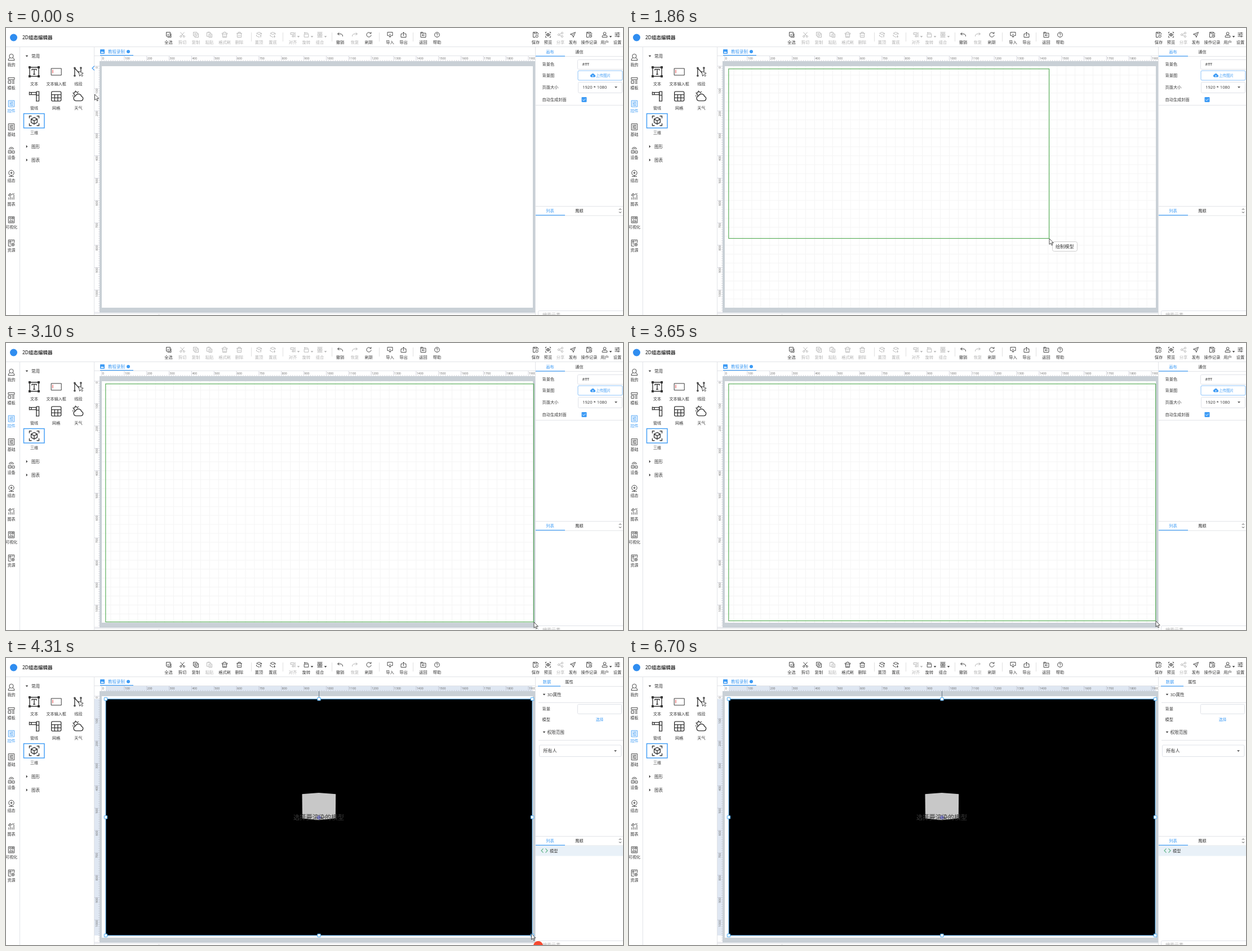
An HTML page that plays this animation: 1095 px wide and 511 px high, repeating every 6800 ms.

```html
<!DOCTYPE html>
<html>
<head>
<meta charset="utf-8">
<title>Editor</title>
<style>
html, body { margin: 0; width: 100%; height: 100%; overflow: hidden; background: #fff; }
svg { display: block; color: #383838; font-family: "Open Sans", "Noto Sans CJK SC", "Noto Sans CJK", sans-serif; }
text { fill: currentColor; white-space: pre; }
.ico { fill: none; stroke: currentColor; stroke-width: .9; }
.dim { color: #b3b3b3; }
.on .wake { color: #383838; }
.blue { color: #3d9bf5; }
</style>
</head>
<body>
<svg id="stage" width="1095" height="511" viewBox="0 0 1095 511"></svg>
<script>
const LOOP = 6800, UNIT = 765 / 1920, X0 = 170, Y0 = 68;
const BLUE = '#3d9bf5', LINE = '#e2e4e8';

// markup helpers
const text = (x, y, s, size = 7.2, anchor = 'middle', extra = '') =>
  `<text x="${x}" y="${y + size * .37}" font-size="${size}" text-anchor="${anchor}" ${extra}>${s}</text>`;
const left = (x, y, s, size, extra) => text(x, y, s, size, 'start', extra);
const rect = (x, y, w, h, fill = 'none', stroke = 'none', extra = '') =>
  `<rect x="${x}" y="${y}" width="${w}" height="${h}" fill="${fill}" stroke="${stroke}" ${extra}/>`;
const hline = (x, y, w, color = LINE, h = 1) => rect(x, y, w, h, color);
const vline = (x, y, h, color = LINE) => rect(x, y, 1, h, color);
const ring = (x, y, r) => `M${x - r} ${y}a${r} ${r} 0 1 0 ${2 * r} 0a${r} ${r} 0 1 0 ${-2 * r} 0`;
const icon = (x, y, d, extra = '') =>
  `<path class="ico" transform="translate(${x} ${y})" d="${d}" ${extra}/>`;
const solid = (x, y, d, fill = 'currentColor') =>
  `<path transform="translate(${x} ${y})" d="${d}" fill="${fill}"/>`;
const caret = (x, y, s = 2.3, fill) => solid(x, y, `M${-s} ${-s / 2}h${2 * s}l${-s} ${s * 1.1}z`, fill);
const group = (cls, body) => `<g class="${cls}">${body}</g>`;
const layer = (id, body) => `<g id="${id}">${body}</g>`;
const field = (x, y, w, h, stroke = '#dfe2e8', fill = '#fff') => rect(x, y, w, h, fill, stroke, 'rx="2"');

// toolbar
const pageBase = 'M4.5-.5v-2l-2-2h-7v9h4M-2.5-4.5v2.5h4.5v-2.5';
const stack = 'M0-4.5l4.5 2-4.5 2.2-4.5-2.2zM-4.5 0v2l4.5 2.4 1-.5M4.5-2.5v2';
const undo = 'M-1.5-4l-3 2.5 3 2.5M-4.5-1.5h4.5q4.5 0 4.5 4.5';
// [x, label, path, state, caret x]; state 0 normal, 1 dim until something is selected, 2 always dim
const tools = [
  [288.5, '全选', 'M-4-4.5h7v7h-7zM-2 4.5h6.5v-6.5M-2.3-1l1.5 1.5 2.6-2.6', 0],
  [313, '剪切', 'M-3.5-4.5l5.5 6.5M3.5-4.5l-5.5 6.5' + ring(-2.8, 3, 1.5) + ring(2.8, 3, 1.5), 1],
  [337, '复制', 'M-4.5-4.5h6.5v6.5h-6.5zM-2 2v2.5h6.5v-6.5h-2.5M-1.2-3v3.5M-3-1.2h3.5', 1],
  [361, '粘贴', 'M-1.5 3h-3v-7h6.5v2.5M-3-4.7h3.5M-1-1.2h5.5v5.7h-5.5zM.5 1h2.5M.5 2.8h2.5', 2],
  [388, '格式刷', 'M-4.5-1v-2h3v-1.7h3v1.7h3v2zM-3.5-1v5.5h7v-5.5M-1.2 1.5v3M1.2 1.5v3', 1],
  [414, '删除', 'M-4.7-2.5h9.4M-2-2.5v-2h4v2M-3.6-2.5v7h7.2v-7M-1.2 0v2.4M1.2 0v2.4', 1],
  [449, '置顶', stack + 'M3 4.8v-4M1.4 2.2l1.6-1.6 1.6 1.6', 1],
  [473.5, '置底', stack + 'M3 .6v4M1.4 3l1.6 1.6 1.6-1.6', 1],
  [509, '对齐', 'M4-4.5v9M-4-3.5h6v3h-6zM-1 1.5h3v2.3h-3z', 2, 519],
  [533, '旋转', 'M-3.8-1h7.6v5.2h-7.6zM-3.8-3.3h5q2 0 2.4 1.4M-2.3-4.8l-1.6 1.5 1.6 1.5', 1, 543],
  [557, '组合', 'M-4.5-4.3h9M-4.5 4.3h9M-3.6-2.3h7.2v4.6h-7.2zM-1.5-.8h3v1.6h-3z', 1, 567],
  [593, '撤销', undo, 0],
  [619, '恢复', undo, 2],
  [644, '刷新', 'M3.3-2.5a4.1 4.1 0 1 0 .8 3M4-4.8v2.6h-2.6', 0],
  [681.5, '导入', 'M-2 1.5h-2.5v-6h9v6h-2.5M0-2v6.3M-2 2.4l2 2 2-2', 0],
  [705.5, '导出', 'M-2-1.5h-2.5v6h9v-6h-2.5M0 2v-6.3M-2-2.4l2-2 2 2', 0],
  [740.5, '返回', 'M-4.5-2.8h9v7.3h-9zM-4.5-2.8v-1.7h3.5l1 1.7M0-1l-2 1.7 2 1.7M-2 .7h4.5', 0],
  [765, '帮助', ring(0, 0, 4.4) + 'M-1.4-1a1.4 1.4 0 1 1 2 1.2q-.6.3-.6 1M0 2v1', 0],
  [940, '保存', pageBase + ring(2.2, 2.5, 2.1), 0],
  [962, '预览', 'M-4 0q4-4.6 8 0q-4 4.6-8 0z' + ring(0, 0, 1.3) + 'M-4.5-2.5v-2h2M2.5-4.5h2v2M4.5 2.5v2h-2M-2.5 4.5h-2v-2', 0],
  [984, '分享', ring(-3, 0, 1.6) + ring(3, -3, 1.6) + ring(3, 3, 1.6) + 'M-1.6-.7l3.2-1.6M-1.6.7l3.2 1.6', 2],
  [1006, '发布', 'M4.5-4.5l-9 3.7 3.8 1.4 1.5 4zM-.7.6l2.4-2.4', 0],
  [1035, '操作记录', pageBase + ring(2.2, 2.2, 2.4) + 'M2.2 1v1.4h1.2', 0],
  [1062.5, '用户', ring(0, -2.2, 2.3) + 'M-4.4 4.4v-1.4q0-2 2.4-2h4q2.4 0 2.4 2v1.4z', 0, 1073],
  [1085, '设置', 'M-4.6-3h9.2M-4.6 0h9.2M-4.6 3h9.2M1.6-4.5v3M-1.6-1.5v3M1.6 1.5v3', 0]
];
const toolbar = () => {
  let s = rect(0, 0, 1095, 33, '#fff') + hline(0, 33, 1095) +
    `<circle cx="13.5" cy="17" r="6.5" fill="#2f8df0"/>` +
    left(29, 17, '2D组态编辑器', 8.5, 'font-weight="600"');
  for (const x of [435, 491, 578, 662, 722]) s += vline(x, 8, 16, '#e0e0e0');
  for (const [x, label, d, state, cx] of tools) {
    const flip = label === '恢复' ? '<g transform="matrix(-1 0 0 1 1238 0)">' : '<g>';
    s += group(['', 'dim wake', 'dim'][state],
      flip + icon(x, 12, d) + '</g>' + text(x, 25, label) + (cx ? caret(cx, 15.5) : ''));
  }
  return s;
};

// left navigation
const sliders = 'M-5.2-5.5h10.4v11h-10.4zM-3.5-2.7h7M-3.5 0h7M-3.5 2.7h7M1.2-3.7v2M-1.2-1v2M1.2 1.7v2';
const sheet = 'M5.2-.5v-5h-10.4v11h5';
const nav = [
  ['我的', ring(0, -2, 3.6) + 'M-2.3 1q-3.2 1-3.2 4.5h11q0-3.5-3.2-4.5'],
  ['模板', 'M-5.5-5h11v3.4h-11zM-5.5.5h4.6v4.7h-4.6zM1.2.5h4.3M1.2 2.8h4.3M1.2 5.1h4.3'],
  ['控件', sliders],
  ['基础', sliders],
  ['设备', 'M-5.3.8h5v4.6h-5zM1.5 1.5h4v3.9h-4zM-3.5 3h1.5M-4-1.3q0-3.8 4-3.8t4 3.8M-1.8-1.2q0-1.8 1.8-1.8t1.8 1.8'],
  ['组态', ring(0, -.8, 4.7) + 'M0-3v4.4M-2.2-.8h4.4M-4.5 5.6h9M0 3.8v1.8'],
  ['图表', 'M-4.5 5.5v-4M-1.5 5.5v-5.5M1.5 5.5v-4M4.5 5.5v-9M-5-3.2a2.2 2.2 0 1 0 2.2-2.2v2.2zM.5-3l1.5-2 1.5 1 1.8-1.8'],
  ['可视化', sheet + 'h5.4v-6M-3.5 3.5l2.5-3.5 2 2 1-1 1.5 2.5z' + ring(-2, -2.8, 1.3) + 'M1-4h2.5v2.5h-2.5z'],
  ['资源', sheet + 'M-3.3-3.5h2.6v2.4h-2.6zM1-3.5h2.3M-3.3 1.5h3' + ring(2.8, 2.8, 2.5) + 'M2.8 1.6v2.4M1.6 2.8h2.4']
];
const navbar = () => nav.map(([label, d], i) => {
  const y = 52 + 41.35 * i;
  return group(i === 2 ? 'blue' : '', icon(9.5, y, d) + text(9.5, y + 13, label, 7.1));
}).join('') + vline(24, 34, 477);

// widget palette
const corners = (a, b) => [[-a, -a], [a, -a], [a, a], [-a, a]]
  .map(([x, y]) => `M${x - b} ${y - b}h${2 * b}v${2 * b}h${-2 * b}z`).join('');
const widgets = [
  ['文本', 'M-8-8h16v16h-16z' + corners(8, 1.3) + 'M-4-2.5v-2h8v2M0-4.5v9M-2 4.5h4'],
  ['文本输入框', 'M-9-6h18v12h-18z'],
  ['线段', 'M-6.5-5.5v11.2M-5.7-5.7l8 9M4.5-5.7v6' + ring(-6.5, -6.8, 1.1) + ring(-6.5, 7, 1.1) + ring(4.5, -7, 1.1)],
  ['管线', 'M-8.5-8v6M-8.5-7h12v4h-12M4-8.5h4.5v17M4-8.5v17M3-2h6M3 8.5h6M-5-7v4'],
  ['网格', 'M-6.5-8.5h13q2 0 2 2v13q0 2-2 2h-13q-2 0-2-2v-13q0-2 2-2zM-8.5-3h17M-8.5 2.8h17M-2.8-3v11.5M2.8-3v11.5'],
  ['天气', 'M-4.5 8h9a4 4 0 0 0 1-7.8a5.5 5.5 0 0 0-10.5-.8a4.4 4.4 0 0 0 .5 8.6zM-6-1.5a3.5 3.5 0 1 1 5-4M-5-8.5v-1.5M-8.5-5.5l-1.4-.7M-9-1l-1.5.4M-.5-7.7l1-1'],
  ['三维', 'M0-6l5.4 3v6l-5.4 3-5.4-3v-6zM-5.4-3l5.4 3 5.4-3M0 0v6M-8.5-4.5v-4h4M4.5-8.5h4v4M8.5 4.5v4h-4M-4.5 8.5h-4v-4']
];
const palette = () => {
  let s = caret(37, 50) + left(45, 50, '常用', 7.6) + vline(156, 34, 477) +
    rect(31.5, 152.5, 36.5, 25.5, '#fff', BLUE, 'stroke-width="1.4"');
  widgets.forEach(([label, d], i) => {
    const x = 50 + 39.2 * (i % 3), row = Math.floor(i / 3), y = 78 + 43.6 * row;
    const width = label === '文本输入框' ? 1 : 1.4;
    s += icon(x, y, d, `style="stroke-width:${width}"`) + text(x, 99 + 43.5 * row, label, 7.1);
  });
  s += vline(82.5, 74.5, 6, '#d33') +
    icon(128.4, 78, 'M.5-1l8.3 3.6-3.2 1.3 2.4 3-1.5 1.3-2.5-3-1.8 2.7z', 'style="fill:#fff"');
  [['图形', 211], ['图表', 235]].forEach(([label, y]) => {
    s += solid(37, y, 'M-1.2-2.4v4.8l2.5-2.4z') + left(45, y, label, 7.6);
  });
  return s;
};

// canvas area with rulers
const rulers = () => {
  let d = '', s = '';
  for (let u = 0; u <= 1920; u += 10) d += `M${X0 + u * UNIT} 59v${u % 100 ? -2 : -9}`;
  for (let u = 0; u <= 1100; u += 10) d += `M166 ${Y0 + u * UNIT}h${u % 100 ? -2 : -9}`;
  s += `<path d="${d}" stroke="#aab" stroke-width=".6" opacity=".8"/>`;
  for (let u = 0; u <= 1900; u += 100) s += left(X0 + u * UNIT + 1, 54, u, 5.2, 'style="color:#666"');
  for (let u = 0; u <= 1000; u += 100) {
    const y = Y0 + u * UNIT + (u ? 5 + (u > 999) * 1.5 : 2.5);
    s += `<g transform="translate(161 ${y}) rotate(-90)" color="#666">${text(0, 0, u, 5.2)}</g>`;
  }
  return s;
};
const gridLines = () => {
  let d = '';
  for (let x = X0 + 40 * UNIT; x < 935; x += 40 * UNIT) d += `M${x} 68V498`;
  for (let y = Y0 + 40 * UNIT; y < 498; y += 40 * UNIT) d += `M170 ${y}H935`;
  return `<path d="${d}" stroke="#f4f4f4"/>`;
};
const handles = () => {
  let s = '';
  for (const x of [177, 555.5, 934]) for (const y of [73, 283.5, 494])
    if (x !== 555.5 || y !== 283.5) s += rect(x - 2.7, y - 2.7, 5.4, 5.4, '#fff', '#45a9f5', 'rx=".5"');
  return s;
};
const workspace = () =>
  group('blue', rect(167, 38, 8, 8, BLUE, 'none', 'rx="1"') + solid(171, 42, 'M-3 2.5l2-3 1.3 1.5 1-1 1.7 2.5z', '#fff') +
    left(181, 42, '教程录制', 7.5) + '<circle cx="217" cy="42" r="3" fill="currentColor"/>') +
  hline(157, 49, 782) + hline(167, 48, 59, BLUE, 1.2) +
  layer('span', rect(177, 50, 757, 9, '#dfe7f2') + rect(157, 73, 9, 421, '#dfe7f2')) + rulers() +
  rect(166, 59, 773, 448, '#c9d0d6') + rect(170, 68, 765, 430, '#fff') +
  hline(157, 508, 782) + vline(271, 508, 3) +
  layer('grid', gridLines()) +
  layer('chevron', icon(154.8, 71.5, 'M2-3.8l-3.8 3.8 3.8 3.8', `style="stroke:${BLUE};stroke-width:1.2"`)) +
  rect(176.8, 72.8, 1, 1, 'none', '#5cb05c', 'id="drag" stroke-width="1.2"') +
  layer('model',
    layer('scene', rect(177, 73, 757, 421, '#000') +
      '<path d="M525.5 242.3L555 240l30.2 2.3-.4 43.2L555 288.6l-29-3.1z" fill="#c8c8c8"/>') +
    text(555, 283.5, '选择要渲染的模型', 11.25, 'middle', 'font-weight="300"') +
    icon(555.3, 284, ring(0, 0, 2.6) + 'M-4 0h8M0-4v8', 'style="stroke:#4a4ab8;stroke-width:.8"') +
    vline(555, 59, 14, '#66788a') +
    rect(177, 73, 757, 421, 'none', '#5bb4f7') + handles()) +
  layer('tip', rect(.5, .5, 44, 17, '#fff', '#cfcfcf', 'rx="3"') + text(22.3, 9, '绘制模型', 8.2));

// right panel
const section = (y, label) => caret(955, y, 2.3) + left(960.5, y, label, 7.6) + hline(945, y + 14, 150);
const pagePanel = () =>
  group('blue', text(965.5, 42, '画布')) + text(1017.5, 42, '通信') + hline(940, 49.5, 52, BLUE, 1.2) +
  left(951.5, 64.5, '背景色') + field(1014.5, 56.5, 82, 17) + left(1022.5, 64.5, '#fff', 7.3) +
  left(951.5, 84, '背景图') + field(1015, 76, 79, 17, '#8cc3fa') +
  group('blue', solid(1041.5, 84.5, 'M-2.7 3h5.4a2.2 2.2 0 0 0 .3-4.3a3.2 3.2 0 0 0-6-.2a2.3 2.3 0 0 0 .3 4.5z') +
    icon(1041.5, 84.5, 'M0 2.6v-3M-1.3.8l1.3-1.3 1.3 1.3', 'style="stroke:#fff;stroke-width:.7"') +
    left(1047, 84.5, '上传图片', 6.5)) +
  left(951.5, 105, '页面大小') + field(1015.5, 96.5, 78, 19) + left(1023, 105.5, '1920 * 1080', 7.7) + caret(1082.5, 105.5, 2.5, '#555') +
  left(951.5, 127, '自动生成封面') + rect(1021.5, 123, 9, 9, BLUE, 'none', 'rx="1.3"') +
  icon(1026, 127.5, 'M-2.5 0l1.8 1.8 3.2-3.4', 'style="stroke:#fff"') + hline(940, 137, 155);
const modelPanel = () =>
  group('blue', text(960, 42, '数据')) + text(999.5, 42, '属性') + rect(944, 49.5, 40, 1.2, BLUE, 'none', 'id="underline"') +
  section(65, '3D属性') + left(951.5, 90.5, '背景') + field(1014.5, 82.5, 78, 17) +
  layer('hex', left(1022.5, 90.5, '#ffffff', 7.3)) +
  left(951.5, 109, '模型') + group('blue', text(1053.5, 109, '选择', 6.8)) +
  section(132, '权限范围') + field(946.5, 155, 145.5, 20.5) + left(953.5, 165.5, '所有人', 8) + caret(1081.5, 165.5, 2.5, '#555') +
  rect(940, 334.5, 155, 18, '#e9f1f8') +
  icon(955.5, 343, 'M-2-3.6l-3.5 3.6 3.5 3.6M2-3.6l3.5 3.6-3.5 3.6', 'style="stroke:#62b58a;stroke-width:1.2"') +
  left(965, 343, '模型');
const sidePanel = () => rect(939, 34, 156, 477, '#fff') + vline(939, 34, 477) + hline(940, 50, 155) +
  hline(940, 317, 155) + hline(940, 333.5, 155) +
  group('blue', text(965.5, 325.5, '列表')) + text(1017.5, 325.5, '鹰眼') + hline(940, 332.7, 52, BLUE, 1.2) +
  icon(1090, 325.5, 'M-2-1.7l2-2 2 2M-2 1.7l2 2 2-2') +
  layer('page', pagePanel()) + layer('props', modelPanel()) +
  field(944.5, 503.5, 154, 18) + left(952, 511.5, '搜索元素', 8, 'style="color:#aaa"');

const svg = document.getElementById('stage');
svg.innerHTML = navbar() + palette() + workspace() + sidePanel() + toolbar() +
  '<circle id="badge" cx="944.5" cy="512.5" r="8.5" fill="#f5492f"/>' +
  '<path id="pointer" d="M0 0v10.3l2.4-2.2 1.7 3.8 1.7-.8-1.7-3.6h3.2z" fill="#fff" stroke="#222" stroke-width=".8"/>';

// pointer track: [ms, x, y] and, where drawing trails behind, [.., x, y] of the trailing point
const track = [
  [0, 157.5, 118], [150, 168, 95, 168, 102], [310, 171, 87, 171, 93], [460, 171, 79, 171, 81],
  [610, 173, 75], [730, 174, 73], [850, 175, 73], [1130, 176, 72.5], [1290, 177, 73],
  [1590, 400, 200], [1710, 659, 341], [1860, 746, 375], [1980, 775, 393], [2100, 810, 415],
  [2220, 850, 438], [2340, 892, 460, 886, 459], [2460, 893, 463, 890, 462], [2580, 908, 474],
  [2700, 925, 485], [2850, 936, 495], [2980, 937, 496], [3100, 937, 497], [3370, 936, 496],
  [3520, 936, 495], [3650, 935, 495], [3770, 934, 494.5], [4160, 934, 495], [4310, 932.5, 491],
  [4430, 922, 485], [4550, 892, 468], [4700, 862, 453], [4820, 848, 446], [4940, 883, 483], [5090, 915, 500]
];
const $ = id => document.getElementById(id);
const show = (id, on) => { $(id).style.display = on ? '' : 'none'; };
const move = (id, x, y) => $(id).setAttribute('transform', `translate(${x} ${y})`);

function render(t) {
  const [, x, y, px = x, py = y] = track.findLast(k => k[0] <= t);
  const placed = t >= 4160, loaded = t >= 4310;
  move('pointer', x, y);
  move('tip', px + 5, py + 5);
  $('drag').setAttribute('width', Math.max(1, px - 177.2));
  $('drag').setAttribute('height', Math.max(1, py - 73.2));
  $('underline').setAttribute('x', loaded ? 944 : 980);
  svg.classList.toggle('on', placed);
  show('pointer', t < 5220);
  show('tip', t >= 150 && t < 2850);
  show('drag', t >= 1590 && !placed);
  show('grid', t >= 150 && !placed);
  show('chevron', t < 150);
  show('page', !placed);
  for (const id of ['props', 'model', 'span']) show(id, placed);
  show('hex', !loaded);
  show('scene', loaded);
  show('badge', placed && t < 6700);
}
let start;
function tick(now) {
  start ??= now;
  render((now - start) % LOOP);
  requestAnimationFrame(tick);
}
render(0);
requestAnimationFrame(tick);
</script>
</body>
</html>
```
